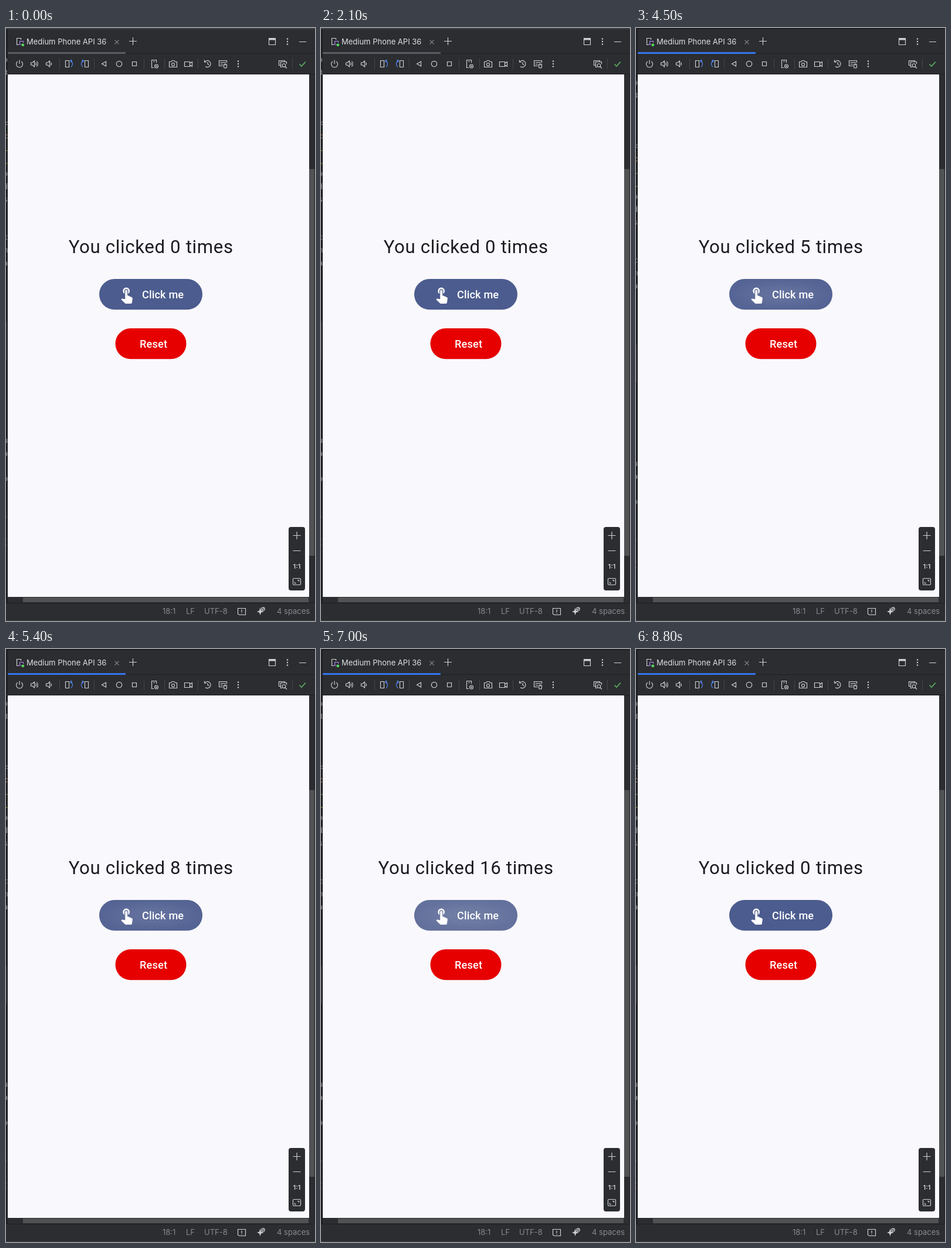
An HTML page for the animation above (9.8 s loop, 527x1009 px).

```html
<!DOCTYPE html>
<html lang="en">
<head>
<meta charset="utf-8">
<title>Click counter</title>
<style>
  html, body { margin: 0; width: 527px; height: 1009px; overflow: hidden; background: #2b2d30; }
  svg { display: block; }
  .ui { font: 13px Inter, sans-serif; }
  .status { fill: #868a91; }
  .code { font: 13px "DejaVu Sans Mono", monospace; text-anchor: end; fill: #8d9096; }
  .count { font: 31.2px Roboto, sans-serif; letter-spacing: .65px; text-anchor: middle; fill: #1b1b21; }
  .label { font: 500 18.2px Roboto, sans-serif; letter-spacing: .13px; fill: #fff; }
  .icon { fill: none; stroke: #ced0d6; stroke-width: 1.15; }
  .dim { stroke: #7d8087; }
  .blue { stroke: #548af7; }
  .sep { stroke: #43454a; stroke-width: 1; }
  .dots { fill: #ced0d6; stroke: none; }
</style>
</head>
<body>
<svg width="527" height="1009" viewBox="0 0 527 1009">
  <defs>
    <radialGradient id="glow">
      <stop offset=".35" stop-color="#fff"/>
      <stop offset="1" stop-color="#fff" stop-opacity=".15"/>
    </radialGradient>
    <clipPath id="gutter"><path d="M0 46H3V978H0Z"/></clipPath>
  </defs>

  <!-- window frame -->
  <rect width="527" height="1009" fill="#2b2d30"/>
  <rect width="527" height="2" id="topEdge"/>
  <path d="M0 2H3V978H0Z M3 43H527V44H3Z M3 78H527V79H3Z M526 79H527V978H526Z M0 978H527V979H0Z" fill="#1e1f22"/>
  <g clip-path="url(#gutter)"><g id="code" class="code"><path d="M.5 500V564" stroke="#43454a"/></g></g>
  <path id="tabLine" d="M3 41H204V44H3Z"/>
  <path d="M517 240H526V898H517Z M29 969H516V977H29Z" fill="#505254"/>
  <path d="M0 1008.5H527" stroke="#3c3e41"/>

  <!-- tab row -->
  <text class="ui" x="35" y="28" fill="#dfe1e5">Medium Phone API 36</text>
  <g class="icon">
    <path d="M22 28.5H18.5V17.5H25.5V20"/>
    <path d="M23.5 27V22.500H29.500V25M21 28H26" stroke="#b189f5"/>
    <path d="M185.500 20.500L192.500 27.500M192.500 20.500L185.500 27.500" class="dim"/>
    <path d="M210 22.500H223M216.500 16V29M500 23.500H512"/>
    <path d="M448.500 17.500H459.500V28.500H448.500Z"/>
    <path d="M448.500 19H459.500" stroke-width="3"/>
  </g>
  <circle cx="28.800" cy="28.800" r="2.400" fill="#55d858"/>

  <!-- emulator toolbar -->
  <path class="sep" d="M91.500 52V70M150.500 52V70M235.500 52V70M270.500 52V70M327.500 52V70M488.500 52V70"/>
  <g class="icon">
    <path d="M19.800 57A5.500 5.500 0 1 0 26.200 57M23 54.500V61"/>
    <g id="speaker"><path d="M42.500 59H45L48.500 56V66L45 63H42.500Z M50.500 58.500Q52.500 61 50.500 63.500"/></g>
    <path d="M52.500 56.500Q56 61 52.500 65.500"/>
    <use href="#speaker" x="26"/>
    <path d="M101.500 55.500H107.500V66.500H101.500Z M128 61"/>
    <path class="blue" d="M109.500 55.500H111Q116 61 111 66.500M112.500 54L109.500 55.500L111.500 58.500"/>
    <path d="M134.500 55.500H140.500V66.500H134.500Z"/>
    <path class="blue" d="M132.500 55.500H131Q126 61 131 66.500M129.500 54L132.500 55.500L130.500 58.500"/>
    <path d="M163.500 61L170.500 57V65Z"/>
    <circle cx="193" cy="61" r="4.700"/>
    <path d="M215.500 57.500H222.500V64.500H215.500Z"/>
    <path d="M252 67.500H248.500V54.500H256.500V59M251 57H254"/>
    <circle cx="256.500" cy="65" r="3"/><circle cx="256.500" cy="65" r=".7"/>
    <path d="M278.500 57.500H281.500L283 55.500H287L288.500 57.500H291.500V66.500H278.500Z"/>
    <circle cx="285" cy="62" r="2.500"/>
    <path d="M304.500 57.500H313.500V65.500H304.500Z M313.500 60L317.500 57.500V65.500L313.500 63"/>
    <path d="M339 57.500A5.600 5.600 0 1 1 340 65.500M338.500 54.500V58H342M344 58V61.500L346.500 62.500"/>
    <path d="M370 64.500H363.500V55.500H376.500V59M365.500 58.500H375M365.500 61.500H370"/>
    <rect x="371.500" y="61" width="5" height="7" rx="2.300"/><path d="M374 61V64"/>
    <path d="M468 63.500H465.500V55.500H475.500V57M471 66.500H468.500V57.500H478.500V61"/>
    <circle cx="474" cy="63.500" r="2.800"/><path d="M476 65.500L479 68.500"/>
    <path d="M500.500 61.500L504 65L511 57.500" stroke="#5fad65" stroke-width="1.700"/>
  </g>
  <g class="dots" id="dots">
    <circle cx="396" cy="56.500" r="1.200"/><circle cx="396" cy="61" r="1.200"/><circle cx="396" cy="65.500" r="1.200"/>
  </g>
  <use href="#dots" x="84" y="-38"/>

  <!-- phone screen -->
  <rect x="3" y="79" width="514" height="889" fill="#f9f8fc"/>
  <text class="count" id="count" x="247.200" y="383"></text>
  <rect x="159" y="427" width="176" height="52.300" rx="26.100" fill="#4c5c8f"/>
  <g id="clickGlow"></g>
  <path transform="translate(190.200 437.700) scale(1.300)" fill="#fff" d="M9 11.240V7.500a2.500 2.500 0 0 1 5 0v3.740c1.210-.81 2-2.180 2-3.740a4.500 4.500 0 0 0-9 0c0 1.560.79 2.930 2 3.740zM18.840 15.870l-4.540-2.260c-.17-.07-.35-.11-.54-.11H13v-6a1.500 1.500 0 0 0-3 0v10.740l-3.430-.72c-.4-.06-.77.04-1.030.3l-.79.8 4.940 4.940c.27.27.65.44 1.060.44h6.790c.75 0 1.330-.55 1.440-1.280l.75-5.270c.1-.7-.3-1.350-.89-1.580z"/>
  <text class="label" x="231.900" y="459.500">Click me</text>
  <rect x="186.500" y="511" width="121" height="52.300" rx="26.100" fill="#e60000"/>
  <g id="resetGlow"></g>
  <text class="label" x="228.100" y="543.500">Reset</text>

  <!-- zoom panel -->
  <rect x="482" y="849" width="28" height="108" rx="4" fill="#2b2d30"/>
  <g class="icon">
    <path d="M489.500 863.500H502.500M496 857V870M489.500 889.500H502.500"/>
    <rect x="489.500" y="936.500" width="13" height="11" rx="1.500"/>
    <path d="M492.500 942.500V945H495M497 939.500H499.500V942"/>
  </g>
  <text x="496" y="920" text-anchor="middle" fill="#ced0d6" style="font:600 11px Inter,sans-serif">1:1</text>

  <!-- status bar -->
  <g class="ui status">
    <text x="267" y="997">18:1</text><text x="307" y="997">LF</text>
    <text x="338" y="997">UTF-8</text><text x="462" y="997">4 spaces</text>
  </g>
  <g class="icon">
    <path d="M395.500 987.500H408.500V998.500H398L395.500 997Z M402 989.500V994M402 995.500V996.800"/>
    <circle cx="438.500" cy="988.500" r="2.700"/><path d="M436.700 990.300L440.300 986.700"/>
  </g>
  <path d="M433.500 986L435 991.500L440 993L435 994.500L433.500 999L432 994.500L428 993L432 991.500Z" fill="#ced0d6"/>
</svg>
<script>
  const LOOP = 9800, STEP = 100, RIPPLE = 750;
  const FOCUS = 3000, SCROLL = 3700, RESET = 8100;
  const CLICKS = [3300, 3600, 3900, 4200, 4500, 4800, 5100, 5400, 5600, 5900,
                  6200, 6400, 6600, 6700, 6900, 7000, 7200];
  const $ = id => document.getElementById(id);

  function add(parent, tag, attrs, text = "") {
    const el = document.createElementNS("http://www.w3.org/2000/svg", tag);
    for (const key in attrs) el.setAttribute(key, attrs[key]);
    el.textContent = text;
    return parent.appendChild(el);
  }

  // Editor text peeking out left of the panel: one character per line.
  const lines = "o3.,.<ciiods. cma   .         ua o  ) (";
  [...lines].forEach((ch, i) => {
    if (ch === " ") return;
    const attrs = { x: 3, y: (58 + i * 21.6).toFixed(1) };
    if (i === 6) attrs.fill = "#cf8e6d";
    if (ch === "i") attrs.fill = "#8fb84a";
    add($("code"), "text", attrs, ch);
  });

  function ripple(group, x, y, width, start) {
    const el = add(group, "rect", { x, y, width, height: 52.3, rx: 26.1 });
    return { el, start };
  }
  const ripples = CLICKS.map(start => ripple($("clickGlow"), 159, 427, 176, start));
  ripples.push(ripple($("resetGlow"), 186.5, 511, 121, RESET));

  function draw(now) {
    const t = Math.floor((now % LOOP) / STEP) * STEP;
    const focused = t >= FOCUS;
    $("topEdge").setAttribute("fill", focused ? "#1e1f22" : "#3e4043");
    $("tabLine").setAttribute("fill", focused ? "#3574f0" : "#5a5d63");
    $("code").setAttribute("transform", `translate(0 ${t >= SCROLL ? 39 : 0})`);

    const clicks = t >= RESET ? 0 : CLICKS.filter(c => c <= t).length;
    const text = `You clicked ${clicks} times`;
    if ($("count").textContent !== text) $("count").textContent = text;

    for (const { el, start } of ripples) {
      const age = t - start;
      const live = age >= 0 && age < RIPPLE;
      el.setAttribute("opacity", live ? 0.087 * (1 - age / RIPPLE) ** 2 : 0);
      el.setAttribute("fill", age < STEP ? "url(#glow)" : "#fff");
    }
  }

  function tick() {
    draw(performance.now());
    requestAnimationFrame(tick);
  }
  tick();
</script>
</body>
</html>
```
